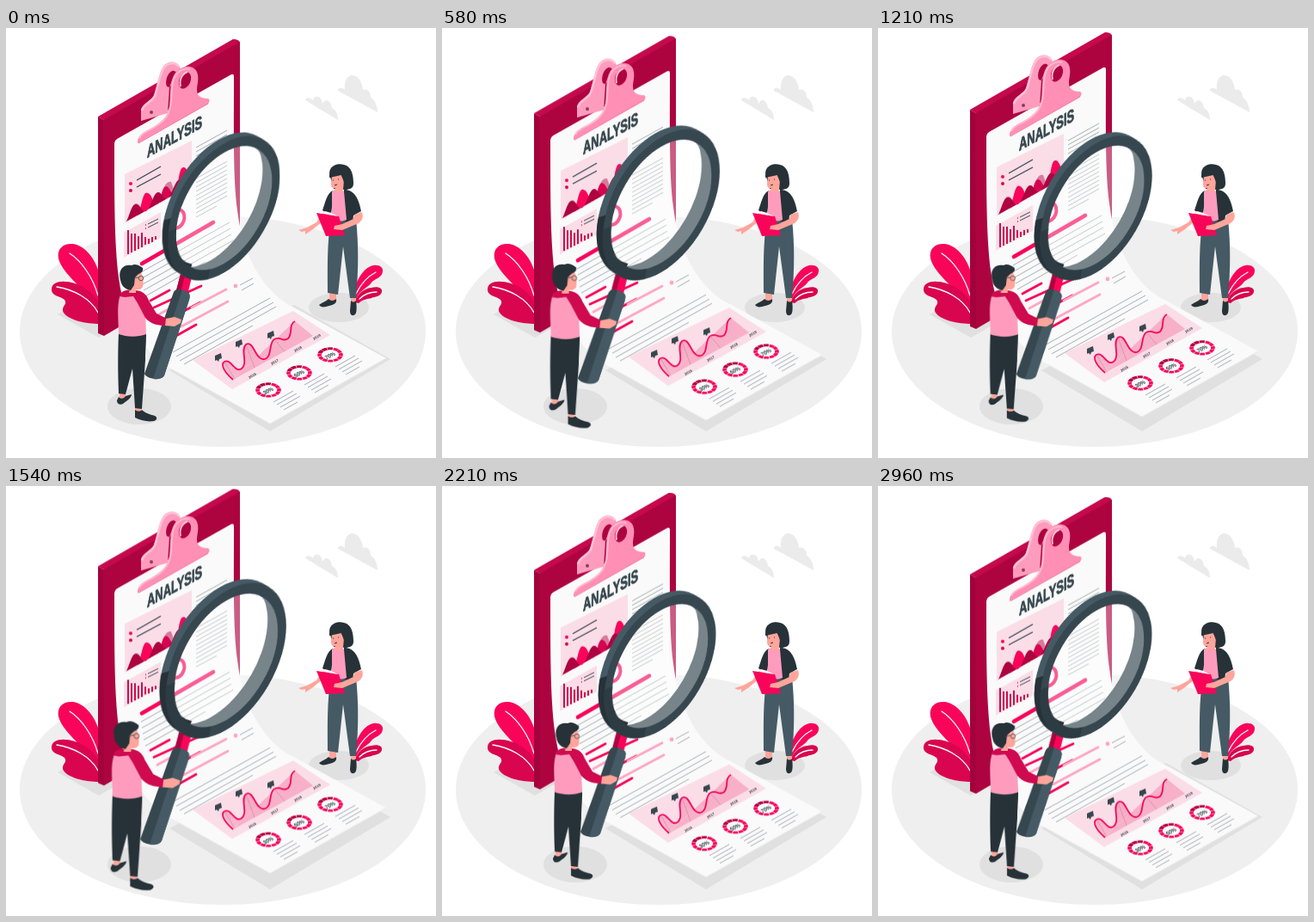
These frames come from a looping animation (500x500 px, 3000 ms). An HTML page without scripts:

```html
<!DOCTYPE html>
<html lang="en">
<head>
<meta charset="utf-8">
<title>Analysis</title>
<style>
  html, body { margin: 0; width: 100%; height: 100%; overflow: hidden; background: #fff; }
  svg { display: block; width: 100vw; height: 100vh; }
  .board { animation: float 3s linear infinite; }
  .zoom { transform-origin: 223px 294px; animation: beat 3s linear infinite; }
  @keyframes float { 50% { transform: translateY(-10px); } }
  @keyframes beat {
    0%, 30%, 40%, 60%, 100% { transform: scale(1); }
    10%, 50% { transform: scale(1.09); }
  }
  .hot { fill: #f8055a; }
  .rose { fill: #d9054e; }
  .deep { fill: #ad0440; }
  .pink { fill: #ff9cbd; }
  .pale { fill: #fbdde7; }
  .ink { fill: #263238; }
  .slate { fill: #37474f; }
  .steel { fill: #455a64; }
  .skin { fill: #ffa59b; }
  .shade { fill: #e0e0e0; }
  .line { fill: none; stroke: #98a1a5; stroke-width: .85; }
  .rule { fill: none; stroke: #37474f; }
  .bar { fill: none; stroke: #f8055a; stroke-linecap: round; }
  .bar.soft { stroke: #ffa6c3; }
  .vein { fill: none; stroke: #fff; stroke-width: 1.3; stroke-linecap: round; }
  text { fill: #37474f; font-weight: 700; font-family: "Liberation Sans", sans-serif; }
  .title { font-size: 20.5px; stroke: #37474f; stroke-width: .9; }
  .year { font-size: 4.4px; }
  .pct { font-size: 7.4px; text-anchor: middle; }
</style>
</head>
<body>
<svg viewBox="0 0 500 500">
  <defs>
    <linearGradient id="area" x1="0" y1="0" x2="0" y2="1">
      <stop offset="0" stop-color="#f59dbb"/>
      <stop offset="1" stop-color="#f8b9ce"/>
    </linearGradient>
    <g id="ring" fill="none" stroke-width="3.8" transform="matrix(.866 -.5 .866 .5 0 0)">
      <circle r="10.2" stroke="#f8055a" stroke-dasharray="4.6 .74"/>
      <circle r="10.2" stroke="#ad0440" stroke-dasharray="4.6 .74 4.6 .74 4.6 60" transform="rotate(-120)"/>
    </g>
    <path id="note" class="line" d="M6 14l23-13m-19 16l23-13m-19 16l23-13m-19 16l16-9"/>
    <path id="tag" class="slate" d="M-4-2l7-3 1 6-3 1-1 3-2-2-2 1z"/>
    <path id="wave" d="M264 409C256 402 248 392 254 388c8-4 12 14 20 8 8-6-2-22 5-28 9-6 11 20 22 17 9-3 4-19 11-23 8-4 10 4 16-1 6-6 0-16 8-20"/>
  </defs>

  <ellipse cx="252" cy="353" rx="236" ry="134" fill="#efefef"/>
  <g class="shade">
    <path d="M60 333L107 306l36 34-35 20z"/>
    <path d="M190 398L335 322 447 385 307 469z"/>
    <ellipse cx="155" cy="440" rx="37" ry="21"/>
    <ellipse cx="387" cy="325" rx="35" ry="17"/>
  </g>

  <!-- clouds -->
  <g fill="#ebebeb">
    <path d="M348 84c1-4 6-3 9 0 0-5 8-6 10 0l1 4c4-8 10-3 11 5 5 2 7 8 7 14z"/>
    <path d="M386 73c0-5 5-4 8-1-1-9 2-17 9-17 7 1 11 8 12 17 6-2 9 3 9 9 5 2 8 10 8 17z"/>
  </g>

  <!-- left plant -->
  <path class="hot" d="M108 328C98 308 66 288 61 268c-2-12 6-18 17-17 13 2 24 15 29 30z"/>
  <path class="rose" d="M108 344c-13 0-38-4-42-15-1-6 6-8 2-13-4-4-15-4-15-12 0-10 14-11 27-7 14 4 24 14 28 23z"/>
  <path class="vein" d="M74 262c14 9 27 28 33 49M59 301c19 3 39 13 48 30"/>

  <!-- right plant -->
  <path class="hot" d="M403 314c2-17 11-33 21-37 7-3 15 0 14 6-1 8-9 8-13 13-5 7-15 9-18 20z"/>
  <path class="rose" d="M406 319c2-10 10-16 19-17 7-2 13 0 12 5-2 6-8 5-12 7-5 1-11 2-15 6z"/>
  <path class="vein" d="M407 309c6-12 13-20 23-25M411 315c5-5 12-8 20-8"/>

  <!-- woman -->
  <g>
    <path class="skin" d="M370 212l-9 14-11 6-10 3 4 2 4-1 0 4 9-6 12-10 6-8zM376 307h8v9l-8 5zM401 310h6v10h-6z"/>
    <path class="steel" d="M378 222h29c3 30 3 58 0 92h-7l-8-60-6 56-12-2c0-28-1-58 4-86z"/>
    <path class="ink" d="M375 315c3 3 7 2 9 0 1 5-3 7-8 8-6 2-10 2-12-1 4-3 8-4 11-7zM401 317c2 2 4 2 6 0 1 7 1 14-1 16-4 3-6 0-6-4z"/>
    <path class="ink" d="M380 189c-7 3-9 15-12 23l8 5 8-12zM393 188c12 0 17 10 20 25l-9 5-1 9-11-3z"/>
    <path class="pink" d="M379 190c4-3 11-3 14 0l3 33c-7 3-13 1-19-1l2-14z"/>
    <path class="ink" d="M377 173c-4-12 8-17 16-14 9 2 11 12 11 22 0 5-4 7-10 7l-13-1z"/>
    <path class="skin" d="M379 172l10-2 4 7-1 11c-2 4-7 5-10 1l1-3c-4 1-5-2-5-5z"/>
    <path class="ink" d="M376 174c-1-12 14-18 20-9 3 6 0 15-1 20l-5-14z"/>
    <path d="M380 177h1m5-1h1m-5 7l3-1" fill="none" stroke="#263238"/>
    <path class="hot" d="M361 215l26 4 7 22-22 1z"/>
    <path fill="#fff" d="M366 215l5-2 7 2 8 4z"/>
    <path class="skin" d="M405 217l9-3c2 6 0 10-4 13l-19 8-10-1 1-4 9-2 13-6z"/>
  </g>

  <g class="board">
    <path fill="#c5094c" d="M107 103L264 13q7 0 8 4L114 107z"/>
    <path fill="#a3033c" d="M107 103l7 4v251l-7-3z"/>
    <path class="deep" d="M113 107L272 16V265L114 358z"/>
    <path fill="#fafafa" d="M126 134q0-3 3-5L262 54q3-1 3 2C265 120 264 175 269 212 276 270 303 310 335 325L442 384 307 460 197 399C163 380 139 350 131 290 126 250 126 200 126 134z"/>
    <path d="M197 399L307 460 442 384" fill="none" stroke="#ebebeb"/>

    <text class="title" transform="matrix(.63 -.35 0 1 164 151)">ANALYSIS</text>

    <!-- upper charts -->
    <path class="pale" d="M138 170l78-39v52l-78 44zM137 238l43-24v30l-43 23z"/>
    <path class="hot" d="M153 218c5-10 6-30 12-26 6 2 6 16 11 13 5-2 4-20 10-21 5 0 6 12 10 8 5-5 4-29 10-30 4-1 6 8 8 9v11z"/>
    <path class="deep" d="M140 225c4-8 6-20 11-20 6 0 6 10 12 8 6-4 8-22 14-22 5 0 6 10 11 7 6-5 9-23 14-21 5 1 7 7 12 5v1z"/>
    <path class="deep" opacity=".45" d="M143 223c2-14 6-22 11-18l6 9zM179 203c3-16 7-26 13-24l5 14z"/>
    <path class="rule" stroke-width="1.4" d="M152 177l28-16m-28 24l28-15"/>
    <circle class="hot" cx="145" cy="181" r="2"/>
    <circle class="rose" cx="145" cy="189" r="2"/>
    <path d="M142 235v28M146 239v22M150 239v20M154 242v15M158 238v17M162 243v9M166 245v6M170 243v6M174 242v4" fill="none" stroke="#c9054a" stroke-width="1.9"/>
    <path class="rule" d="M165 228l12-6m-12 10l12-6"/>
    <path d="M162 229h1m-1 4h1" stroke="#f8055a" stroke-width="1.6"/>
    <ellipse cx="199" cy="222" rx="8" ry="11" fill="none" stroke="#f8055a" stroke-width="4" transform="rotate(20 199 222)"/>
    <path d="M193 231q-4-10 3-17" fill="none" stroke="#ff9cbd" stroke-width="4"/>

    <!-- body copy -->
    <path class="line" d="M221 139l36-20m-36 25l36-20m-36 25l36-20m-36 25l36-20m-36 25l36-20M221 175l36-20m-36 25l36-20m-36 25l36-20m-36 25l36-20m-36 25l36-20m-36 25l36-20m-36 25l36-20m-36 25l36-20m-36 25l36-20m-36 25l24-13"/>
    <path class="bar" stroke-width="4.6" d="M158 274l83-48"/>
    <path class="line" d="M157 284l103-58m-102 65l103-58m-102 65l103-58m-102 65l104-58m-102 65l70-40"/>
    <path class="bar" stroke-width="2.8" d="M168 317l22-12M172 325l55-25M190 338l36-19M196 359l25-14"/>
    <path class="bar soft" stroke-width="2.8" d="M216 325l40-21M204 347l54-29M176 334l20-11"/>
    <circle cx="267" cy="300" r="2.4" fill="#ffa6c3"/>
    <path class="line" d="M272 299l15-8m-13 14l14-8M194 377l113-63m-109 68l113-63m-109 68l112-63m-107 67l80-45"/>

    <!-- lower chart -->
    <path class="pale" d="M217 386l117-57 43 28-114 63z"/>
    <use href="#wave" fill="url(#area)"/>
    <path d="M264 409L336 341l21 17z" fill="#f7b0c8"/>
    <use href="#wave" fill="none" stroke="#f8055a" stroke-width="1.8"/>
    <path d="M254 388l12 20M279 368l10 27M312 362l12 14" fill="none" stroke="#c27a96" stroke-width=".5"/>
    <use href="#tag" x="247" y="383"/>
    <use href="#tag" x="271" y="367"/>
    <use href="#tag" x="308" y="357"/>
    <g class="year">
      <text transform="matrix(.866 -.5 .5 .8 283 408)">2016</text>
      <text transform="matrix(.866 -.5 .5 .8 309 392)">2017</text>
      <text transform="matrix(.866 -.5 .5 .8 336 377)">2018</text>
      <text transform="matrix(.866 -.5 .5 .8 358 363)">2019</text>
    </g>
    <g transform="translate(305 421)">
      <use href="#ring"/>
      <text class="pct" transform="matrix(.75 -.42 .45 .8 1 3)">30%</text>
      <use href="#note"/>
    </g>
    <g transform="translate(341 401)">
      <use href="#ring"/>
      <text class="pct" transform="matrix(.75 -.42 .45 .8 1 3)">50%</text>
      <use href="#note"/>
    </g>
    <g transform="translate(377 380)">
      <use href="#ring"/>
      <text class="pct" transform="matrix(.75 -.42 .45 .8 1 3)">70%</text>
      <use href="#note"/>
    </g>

    <!-- clip: rear plate, then front plate -->
    <path class="pink" d="M157 108V95c2-8 12-10 15-17 4-11 5-23 10-32 5-8 16-9 20-1l2 6-14 18-2 30z"/>
    <path d="M158 96c2-8 12-10 15-17 4-11 5-23 10-32 5-7 14-8 18-2" fill="none" stroke="#ffc2d6" stroke-width="2.5"/>
    <path class="deep" d="M187 68c-3-8 3-20 9-18l4 3c-5 4-8 10-10 16z"/>
    <circle cx="169" cy="98" r="2" fill="#8f3a58"/>
    <path fill="#ff8fb4" d="M153 134c-1-8 7-12 15-16 13-6 20-15 22-27 2-14-1-32 9-41 7-7 19-7 23 1 3 8 0 15 0 21 0 8 6 10 13 10 2 1 2 4 0 6z"/>
    <path d="M155 128c3-7 13-9 18-13 13-8 18-16 19-29 1-14 0-28 9-35 4-3 9-4 13-3" fill="none" stroke="#ffb8cf" stroke-width="2"/>
    <path d="M154 134l81-46" stroke="#f8719f"/>
    <ellipse class="deep" cx="208" cy="61" rx="6.5" ry="10" transform="rotate(24 208 61)"/>
    <path d="M203 68c-2-8 2-15 8-17" fill="none" stroke="#ffc2d6" stroke-width="2"/>
  </g>

  <g class="zoom">
    <!-- handle -->
    <path class="hot" d="M203 286l13 4-5 20-13-5z"/>
    <path class="deep" d="M203 286l5 2-5 20-5-3z"/>
    <path class="slate" d="M195 307q3-5 8-3l8 3q4 2 2 9l-29 88c-3 6-20 5-23-2z"/>
    <path class="steel" d="M205 304l6 3q4 2 2 9l-29 88c-2 4-8 5-13 4z"/>

    <!-- lens: glass, rear rim, inner wall, front rim -->
    <g transform="matrix(.866 -.5 0 1 253.5 209.5)" fill="none">
      <circle r="66" fill="#fff" opacity=".35"/>
      <circle cx="-4" cy="-4" r="70" stroke="#37474f" stroke-width="10"/>
      <circle cx="-8" cy="-8" r="70" stroke="#455a64" stroke-width="10"/>
      <path d="M46-46A65 65 0 0 1-46 46 70 70 0 0 0 46-46z" fill="#77848a"/>
      <path d="M-75-25A70 70 0 0 0-46 49" stroke="#263238" stroke-width="12"/>
      <circle r="69.7" stroke="#37474f" stroke-width="10.6"/>
      <path d="M-69-9A69.7 69.7 0 0 0-20 66.800" stroke="#2d3c43" stroke-width="10.6"/>
    </g>

    <!-- man -->
    <path class="skin" d="M132 422h7v9h-7zM150 438h7v9h-7z"/>
    <path class="ink" d="M131 354l32 1c0 12-1 20-1 31l-4 57-8-1-3-46-8 30-8-1c-1-26-1-47 0-71z"/>
    <path class="ink" d="M131 429c3 3 6 2 8-1l7-2c0 4-6 8-10 11-5 2-7-1-7-4zM150 444c3 2 6 2 8 0 4 4 9 5 15 7 4 2 2 5-1 6-7 1-14 0-22-4z"/>
    <path class="pink" d="M134 308c7-4 16-2 20 0l8 22 1 26c-11 4-23 3-32 0 0-16-3-36 3-48z"/>
    <path class="rose" style="fill:#cf0a4f" d="M132 312c1-6 8-8 13-7 9-1 18 2 21 12l9 15 12 6-2 8c-9 0-17-2-23-9l-9-17-5-8-10 1z"/>
    <path class="skin" d="M148 288l9-4c3 6 3 13 2 17-2 4-6 3-8 3v4h-8l2-12z"/>
    <path class="ink" d="M133 293c-3-11 3-19 13-17 6-3 11 2 13 3 1 4-2 6-5 7l-4 4-1 9-4 6c-7-1-11-6-12-12z"/>
    <path class="rule" stroke-width=".8" d="M148 291l6-1"/>
    <circle class="rule" style="fill:none" stroke-width=".8" cx="157" cy="291" r="2.7"/>
    <path class="skin" d="M186 338l10-2 8 3-1 4-7 4-11-1z"/>
  </g>
</svg>
</body>
</html>
```
